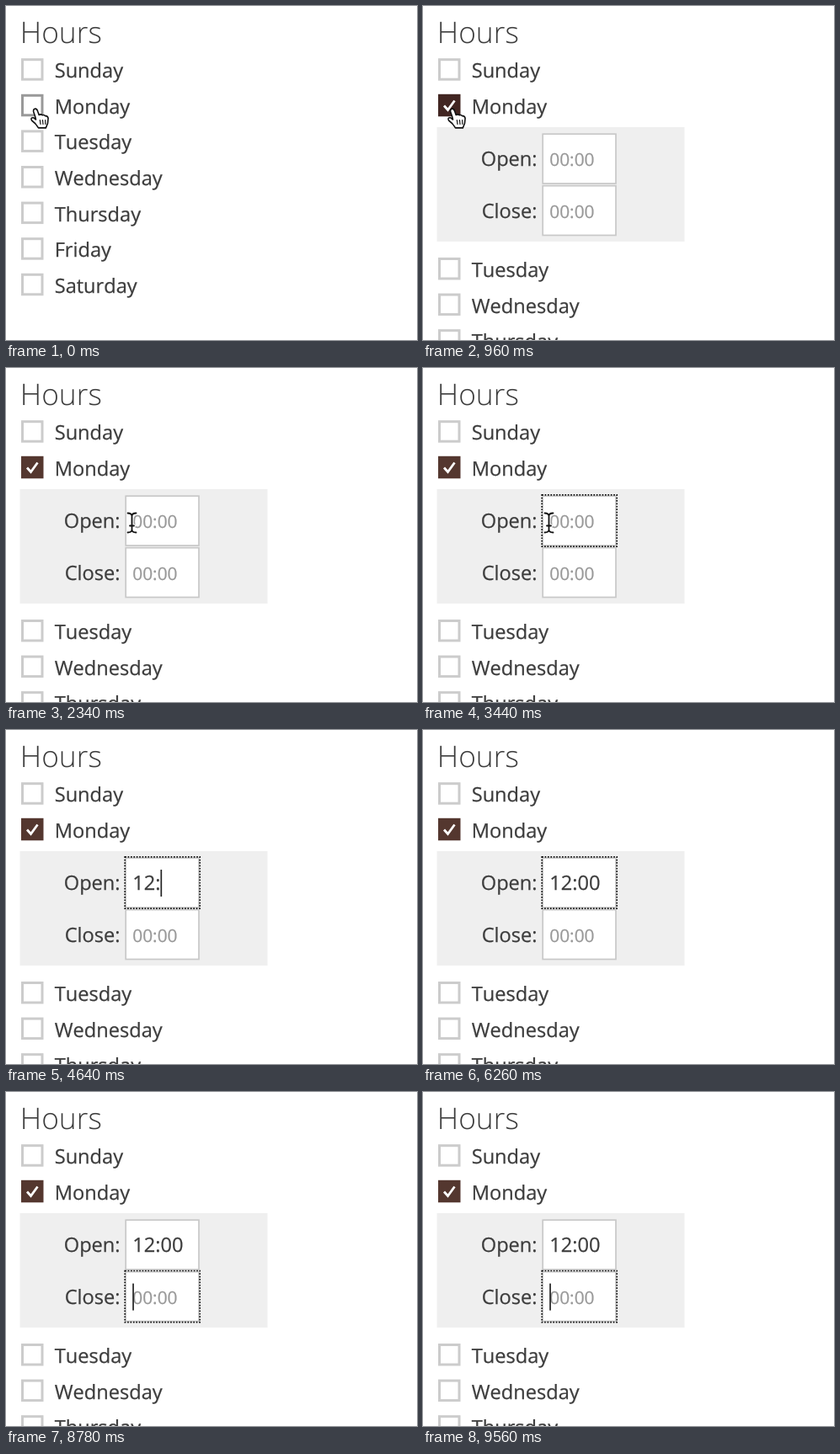
An HTML page that plays this animation: 488 px wide and 397 px high, repeating every 9.58 s.

```html
<!DOCTYPE html>
<html lang="en">
<head>
<meta charset="utf-8">
<title>Hours</title>
<style>
  html, body { margin: 0; width: 100%; height: 100%; overflow: hidden; background: #fff; }
  svg { display: block; width: 488px; height: 397px; }
  text {
    font: 23.6px "Open Sans", "Noto Sans", sans-serif;
    font-kerning: none; text-rendering: geometricPrecision;
    fill: #3c3c3c; stroke: #3c3c3c; stroke-width: .25;
  }
  .title { font-size: 35.3px; font-weight: 300; stroke: none; }
  .hint { font-size: 20.9px; fill: #999; stroke: #999; }
  .label { text-anchor: end; }
  .box { fill: #fff; stroke: #ccc; stroke-width: 3; }
  .input { fill: #fff; stroke: #c8c8c8; stroke-width: 1.7; }
  #focus { fill: none; stroke: #111; stroke-width: 1.7; stroke-dasharray: 1.7 1.7; }
  #caret { fill: #222; }
  .pointer { stroke-linejoin: round; stroke-linecap: round; }
</style>
</head>
<body>
<svg viewBox="0 0 488 397">
  <text class="title" x="16.8" y="43.7">Hours</text>
  <g id="days"></g>
  <path id="tick" d="M25 118.5l4.5 5 8-11" fill="none" stroke="#fff" stroke-width="2.8"/>
  <g id="panel">
    <rect x="16.5" y="144" width="294" height="136" fill="#efefef"/>
    <rect class="input" x="142.2" y="152.2" width="86.8" height="58.8"/>
    <rect class="input" x="142.2" y="213.7" width="86.8" height="58.8"/>
    <text class="label" x="135.6" y="190.1">Open:</text>
    <text class="label" x="135.6" y="251.9">Close:</text>
    <text id="open" x="150.2" y="190"></text>
    <text class="hint" x="150.2" y="251.8">00:00</text>
    <rect id="focus" x="141.2" y="150.9" width="89" height="61.2"/>
    <rect id="caret" y="166" width="1.7" height="32"/>
  </g>
  <g id="hand" class="pointer" fill="#fff" stroke="#111" stroke-width="1.6">
    <path d="M-1 9.5L-2.9 4Q-3.2 .8 -.7 .6Q1.3 .5 2.3 4L3.7 8Q6 6.5 7.7 8.3Q10 7.3 11 9.2Q14 8.8 14.6 12L14 18 11.8 23.4H3Q0 18-5 14.5Q-6.7 11-3 11.2L0 13.5Z"/>
    <path d="M4.8 14l.7 5M8 14l.5 5M11.2 14l.2 5" stroke-width="1.2"/>
  </g>
  <g id="arrow" class="pointer" stroke="#fff" stroke-width="1.8" style="filter:drop-shadow(0 1.5px 1.2px #0006)">
    <path d="M0 0V20.5L4.6 16.3 8.3 24.6 12 22.8 8.5 14.8H14.5Z"/>
  </g>
  <g id="beam" class="pointer" fill="none">
    <path d="M-5-11.5Q0-11.5 0-8Q0-11.5 5-11.5M0-8V8M-5 11.5Q0 11.5 0 8Q0 11.5 5 11.5M-2.5 3.5H2.5" stroke="#fff" stroke-width="4"/>
    <path d="M-5-11.5Q0-11.5 0-8Q0-11.5 5-11.5M0-8V8M-5 11.5Q0 11.5 0 8Q0 11.5 5 11.5M-2.5 3.5H2.5" stroke="#111" stroke-width="1.8"/>
  </g>
</svg>
<script>
const LOOP = 9580, CHECK = 500, FOCUS = 2640, TAB = 6460;
const KEYS = [3500, 3820, 4320, 5200, 5500];   // one time per typed character
const VALUE = '12:00', PITCH = 42.6, PANEL_SHIFT = 151.6;
const NAMES = ['Sunday', 'Monday', 'Tuesday', 'Wednesday', 'Thursday', 'Friday', 'Saturday'];

const $ = id => document.getElementById(id);
const show = (node, on) => node.style.display = on ? '' : 'none';
const clamp = v => Math.max(0, Math.min(1, v));
const mix = (a, b, p) => a + (b - a) * p;
const ease = p => p < .5 ? 4 * p ** 3 : 1 - (2 - 2 * p) ** 3 / 2;

$('days').innerHTML = NAMES.map((name, i) => `<g transform="translate(0 ${i * PITCH})">
  <rect class="box" x="19.5" y="63.7" width="23.5" height="23.5"/>
  <text x="57.7" y="85.2">${name}</text></g>`).join('');
const days = [...$('days').children];
const monday = days[1].firstElementChild;

function drawCheckbox(t, checked) {
  const fade = clamp((t - 1980) / 200);
  const brown = `rgb(${mix(66, 84, fade)},${mix(38, 55, fade)},${mix(34, 47, fade)})`;
  monday.style.fill = checked ? brown : '#fff';
  monday.style.stroke = checked ? brown : '#999';
  show($('tick'), checked);
}

function drawField(t) {
  const typed = KEYS.filter(k => t >= k).length;
  const open = $('open');
  open.textContent = typed ? VALUE.slice(0, typed) : '00:00';
  open.classList.toggle('hint', !typed);

  const focused = t >= FOCUS, onClose = t >= TAB;
  const lastInput = onClose ? TAB : typed ? KEYS[typed - 1] : FOCUS;
  const textWidth = typed && !onClose ? open.getComputedTextLength() : 0;
  const drop = `translate(0 ${onClose ? 61.6 : 0})`;
  $('focus').setAttribute('transform', drop);
  $('caret').setAttribute('transform', drop);
  $('caret').setAttribute('x', 150.2 + textWidth);
  show($('focus'), focused);
  show($('caret'), focused && (t - lastInput) % 1000 < 500);
}

function drawPointer(t) {
  const p = ease(clamp((t - 1820) / 500));
  const x = mix(35.5, 149.5, p), y = mix(121.5, 184, p) + 14 * p * (1 - p);
  const shape = x < 44 ? 'hand' : x < 141 ? 'arrow' : 'beam';
  for (const id of ['hand', 'arrow', 'beam']) {
    $(id).setAttribute('transform', `translate(${x} ${y})`);
    show($(id), id === shape && t < KEYS[0]);
  }
}

function draw(t) {
  const checked = t >= CHECK;
  days.forEach((day, i) => day.setAttribute('transform',
    `translate(0 ${i * PITCH + (checked && i > 1 ? PANEL_SHIFT : 0)})`));
  show($('panel'), checked);
  drawCheckbox(t, checked);
  drawField(t);
  drawPointer(t);
}

const start = performance.now();
function tick() {
  draw((performance.now() - start) % LOOP);
  requestAnimationFrame(tick);
}
tick();
</script>
</body>
</html>
```
